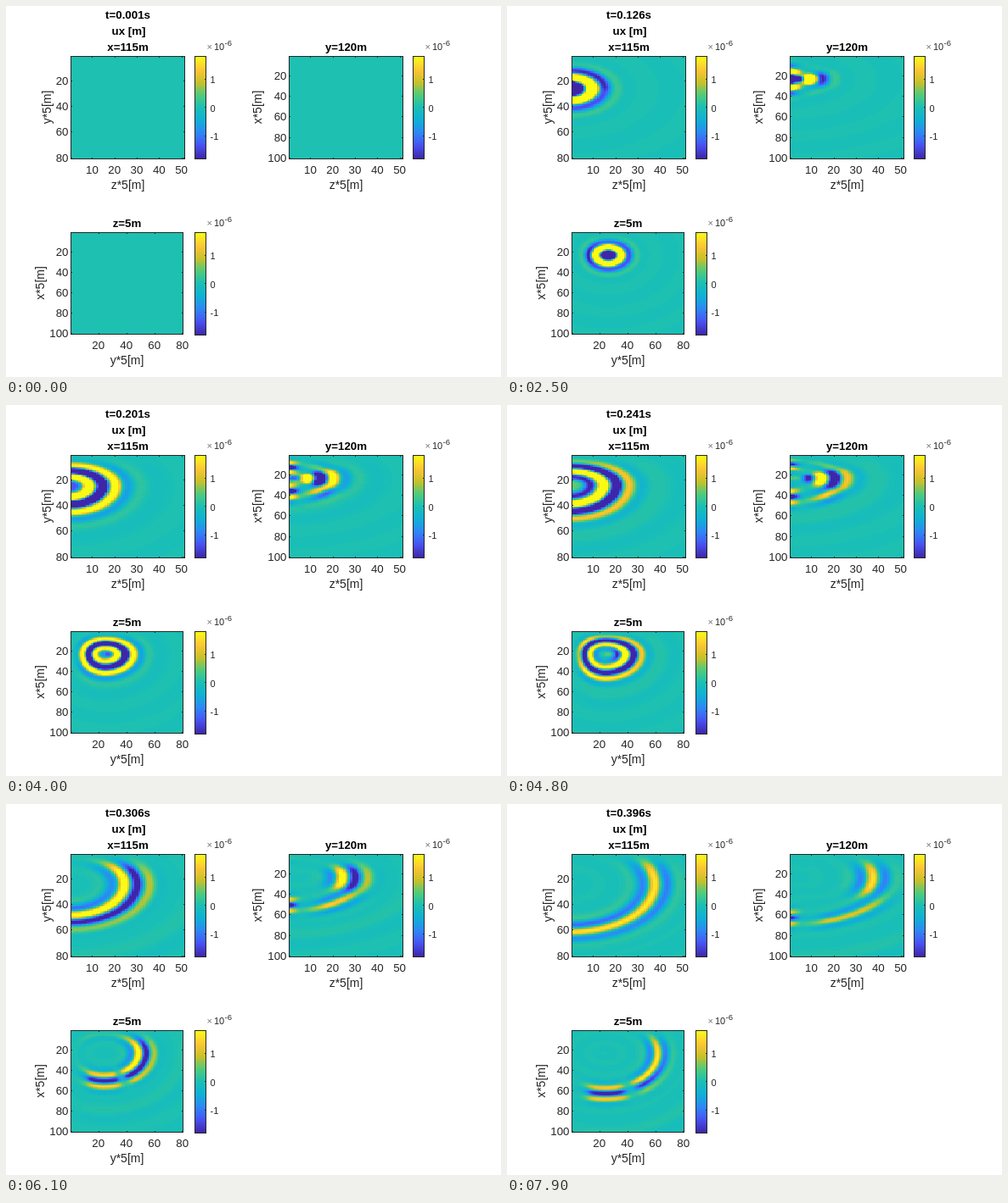
An HTML page with a canvas that plays this animation: 583x438 px, repeating every 8 s.

```html
<!DOCTYPE html>
<html lang="en">
<head>
<meta charset="utf-8">
<title>Displacement slices</title>
<style>
html, body { margin: 0; width: 100%; height: 100%; overflow: hidden; background: #fff; }
canvas, svg { position: absolute; left: 0; top: 0; }
text { font-family: "Liberation Sans", Arial, sans-serif; fill: #262626; }
.title { font-weight: bold; font-size: 13.3px; fill: #000; text-anchor: middle; }
.tick { font-size: 13.3px; }
.label { font-size: 14px; text-anchor: middle; }
.small { font-size: 11px; }
.power { font-size: 9.5px; }
.line { fill: none; stroke: #262626; stroke-width: 1; shape-rendering: crispEdges; }
</style>
</head>
<body>
<canvas id="stage" width="583" height="438"></canvas>
<svg id="axes" width="583" height="438" viewBox="0 0 583 438"></svg>
<script>
const LOOP = 8000, STEP = 100, LIMIT = 1.8, LEVELS = 64, WAVELENGTH = 12.3;
const ctx = document.getElementById('stage').getContext('2d');
const svg = document.getElementById('axes');

const clamp = v => Math.max(0, Math.min(1, v));
const mix = (a, b, k) => a + (b - a) * k;
const bell = v => Math.exp(-v * v);
const plateau = v => Math.exp(-(v ** 4));

function along(times, values, t) {
  let i = 1;
  while (i < times.length - 1 && t > times[i]) i++;
  return mix(values[i - 1], values[i], clamp((t - times[i - 1]) / (times[i] - times[i - 1])));
}

// Colour map
const STOPS = [[62, 38, 168], [72, 82, 244], [46, 135, 247], [14, 176, 214], [26, 191, 181],
  [79, 203, 124], [200, 193, 41], [254, 197, 52], [249, 251, 21]];
const palette = Array.from({ length: LEVELS }, (_, i) => {
  const p = i / (LEVELS - 1) * 8, n = Math.min(7, Math.floor(p));
  return STOPS[n].map((c, j) => Math.round(mix(c, STOPS[n + 1][j], p - n)));
});
const colour = v => palette[Math.min(LEVELS - 1, Math.floor(clamp((v / LIMIT + 1) / 2) * LEVELS))];

// Wave parameters over time
const TIMES = [0, .03, .081, .161, .241, .306, .356, .396];
const TRACKS = {
  bodyAmp:   [0, .4, 5, 4.5, 3.5, 2.5, 2, 1.65],
  bodyMid:   [8, 8, 6, 1, -4, -3, -4, -6],
  bodyWidth: [6, 6, 5.5, 7, 7, 6, 5.5, 5.5],
  surfAmp:   [0, .4, 5, 4, 2.8, 2.4, 2.2, 2.1],
  surfMid:   [8, 8, 6, 2, 0, 0, 0, 0],
  slantAmp:  [0, .3, 2.5, 3, 1.6, 1.4, 1.2, 1.1],
  slantMid:  [8, 8, 8, 8, 5.5, 5.5, 5.5, 5.5],
  centreY:   [27, 27, 27, 25.3, 24, 24, 24, 24],
  squeeze:   [1, 1, 1, 1.1, 1.35, 1.1, 1, 1]
};

function stateAt(t) {
  const s = { t };
  for (const name in TRACKS) s[name] = along(TIMES, TRACKS[name], t);
  s.bodyR = 30.3 + 148 * (t - .306);
  s.surfR = 27.5 + 138 * (t - .306);
  s.early = clamp((.14 - t) / .059);
  s.late = clamp((t - .25) / .06);
  return s;
}

const wave = (d, mid, width) =>
  -Math.cos(2 * Math.PI * d / WAVELENGTH) * Math.exp(-(((d - mid) / width) ** 2) / 2);
const radius = (a, b) => Math.hypot(a, b, 2.5);
const offset = (v, centre, s) => (v - centre) * (v < centre ? s.squeeze : 1);
const damp = (v, k, s) => v < 0 ? v * mix(1, k, s.early) : v;
const sponge = (v, size, s) => 1 - bell(v / mix(7, size, s.late));

function forerunner(r, s) {
  const d = r - 240 * (s.t - .03);
  return -.1 * clamp((s.t - .06) / .08) * Math.cos(2 * Math.PI * d / 22) * bell((d + 6) / 13);
}

function fieldYZ(z, y, s) {
  const dy = offset(y, s.centreY, s), r = radius(z, dy), side = (dy / r) ** 2;
  const upper = dy < 0 ? 1 - s.late * side ** 1.5 : 1;
  const v = s.bodyAmp * upper * wave(r - s.bodyR, s.bodyMid - 1.2 * s.late * side, s.bodyWidth);
  return (damp(v, Math.max(.1, clamp((29 - y) / 4)), s) + forerunner(r, s)) * sponge(y, 9, s);
}

function fieldXZ(z, x, s) {
  const dx = offset(x, 23, s), r = radius(z, dx);
  const lobe = plateau(dx / r / .5), skin = bell(z / 4), deep = clamp((z - 5) / 12);
  const body = s.bodyAmp * wave(r - s.bodyR, s.bodyMid, s.bodyWidth);
  const slant = s.slantAmp * wave(r - s.bodyR + 3.5, s.slantMid, 5) * (dx < 0 ? .4 : 1);
  const surf = s.surfAmp * wave(r - s.surfR, s.surfMid, 6);
  const v = lobe * body + (1 - lobe) * (deep * slant + skin * surf);
  return (damp(v, Math.max(.1, plateau((x - 22.5) / 5.5)), s) + forerunner(r, s)) * sponge(x, 12, s);
}

function fieldXY(y, x, s) {
  const dy = offset(y, s.centreY, s), dx = offset(x, 23, s), r = radius(dy, dx);
  const side = (dx / r) ** 2, front = mix(s.bodyR, s.surfR, side);
  const node = 1 - .85 * s.late * bell((dy / r - .45) / .12) * (dx > 0);
  const left = dy < 0 ? 1 - s.late * .9 * (1 - plateau(dy / 14)) : 1;
  const v = mix(s.bodyAmp, s.surfAmp, side) * node * left *
    wave(r - front, mix(s.bodyMid, s.surfMid, dy < 0 ? 1 : side), mix(s.bodyWidth, 6, side));
  return (damp(v, Math.max(.1, clamp((23 - y) / 5) * plateau(dx / 8)), s) + forerunner(r, s)) *
    sponge(x, 12, s) * sponge(y, 7, s);
}

const panels = [
  { x: 77, y: 59, w: 134, h: 121, cols: 51, rows: 80, field: fieldYZ, bar: 222, name: 'x=115m',
    across: 'z*5[m]', down: 'y*5[m]', downX: 53, xt: [10, 20, 30, 40, 50], yt: [20, 40, 60, 80] },
  { x: 334, y: 59, w: 134, h: 121, cols: 51, rows: 100, field: fieldXZ, bar: 479, name: 'y=120m',
    across: 'z*5[m]', down: 'x*5[m]', downX: 301, xt: [10, 20, 30, 40, 50], yt: [20, 40, 60, 80, 100] },
  { x: 77, y: 267, w: 132, h: 120, cols: 80, rows: 100, field: fieldXY, bar: 222, name: 'z=5m',
    across: 'y*5[m]', down: 'x*5[m]', downX: 45, xt: [20, 40, 60, 80], yt: [20, 40, 60, 80, 100] }
];

function add(tag, attrs, content = '') {
  const el = document.createElementNS('http://www.w3.org/2000/svg', tag);
  for (const k in attrs) el.setAttribute(k, attrs[k]);
  el.textContent = content;
  svg.append(el);
  return el;
}
const text = (cls, x, y, content, more = {}) => add('text', { class: cls, x, y, ...more }, content);
const line = d => add('path', { class: 'line', d });
const box = (x, y, w, h) => line(`M${x - .5} ${y + .5}h${w}v${h}h${-w}z`);

function drawAxes(p) {
  const mid = p.x + p.w / 2 - .5, base = p.y + p.h;
  box(p.x, p.y, p.w, p.h);
  text('title', mid, p.y - 6, p.name);
  for (const v of p.xt) {
    const x = p.x + (v - .5) * p.w / p.cols;
    line(`M${x} ${base}v-1M${x} ${p.y + 1}v1`);
    text('tick', x - .5, base + 18, v, { 'text-anchor': 'middle' });
  }
  for (const v of p.yt) {
    const y = p.y + (v - .5) * p.h / p.rows;
    line(`M${p.x} ${y}h1M${p.x + p.w - 1} ${y}h-1`);
    text('tick', p.x - 3.5, y + 4.5, v, { 'text-anchor': 'end' });
  }
  text('label', mid, base + 36, p.across);
  const cy = p.y + p.h / 2;
  text('label', 0, 0, p.down, { transform: `translate(${p.downX} ${cy}) rotate(-90)` });

  box(p.bar + .5, p.y, 13, 121);
  for (const v of [1, 0, -1]) {
    const y = p.y + 60.5 - v * 33.5;
    line(`M${p.bar + 13} ${y}h-1`);
    text('small', p.bar + 18.5, y + 5, v);
  }
  text('small', p.bar + 14.5, p.y - 7, '×', { style: 'fill:#777' });
  text('small', p.bar + 23, p.y - 7, '10');
  text('power', p.bar + 35.5, p.y - 12, '-6');
}

panels.forEach(p => {
  drawAxes(p);
  p.grid = document.createElement('canvas');
  p.grid.width = p.cols;
  p.grid.height = p.rows;
  p.ctx = p.grid.getContext('2d');
  p.image = p.ctx.createImageData(p.cols, p.rows);
});
const clock = text('title', 143.5, 15, '');
text('title', 144.5, 34, 'ux [m]');

ctx.fillStyle = '#fff';
ctx.fillRect(0, 0, 583, 438);
ctx.imageSmoothingEnabled = false;
for (const p of panels) {
  palette.forEach((c, i) => {
    const top = Math.round(p.y + 121 * (1 - (i + 1) / LEVELS));
    ctx.fillStyle = `rgb(${c})`;
    ctx.fillRect(p.bar, top, 13, p.y + 121 - top - Math.floor(121 * i / LEVELS));
  });
}

function drawField(p, s) {
  let n = 0;
  for (let row = 1; row <= p.rows; row++) {
    for (let col = 1; col <= p.cols; col++) {
      p.image.data.set(colour(p.field(col, row, s)), n);
      p.image.data[n + 3] = 255;
      n += 4;
    }
  }
  p.ctx.putImageData(p.image, 0, 0);
  ctx.drawImage(p.grid, p.x, p.y, p.w, p.h);
}

let shown = -1;
const start = performance.now();
function tick() {
  const step = Math.floor((performance.now() - start) % LOOP / STEP);
  if (step !== shown) {
    shown = step;
    const t = .001 + step * .005;
    clock.textContent = `t=${t.toFixed(3)}s`;
    const s = stateAt(step ? t : 0);
    panels.forEach(p => drawField(p, s));
  }
  requestAnimationFrame(tick);
}
tick();
</script>
</body>
</html>
```
